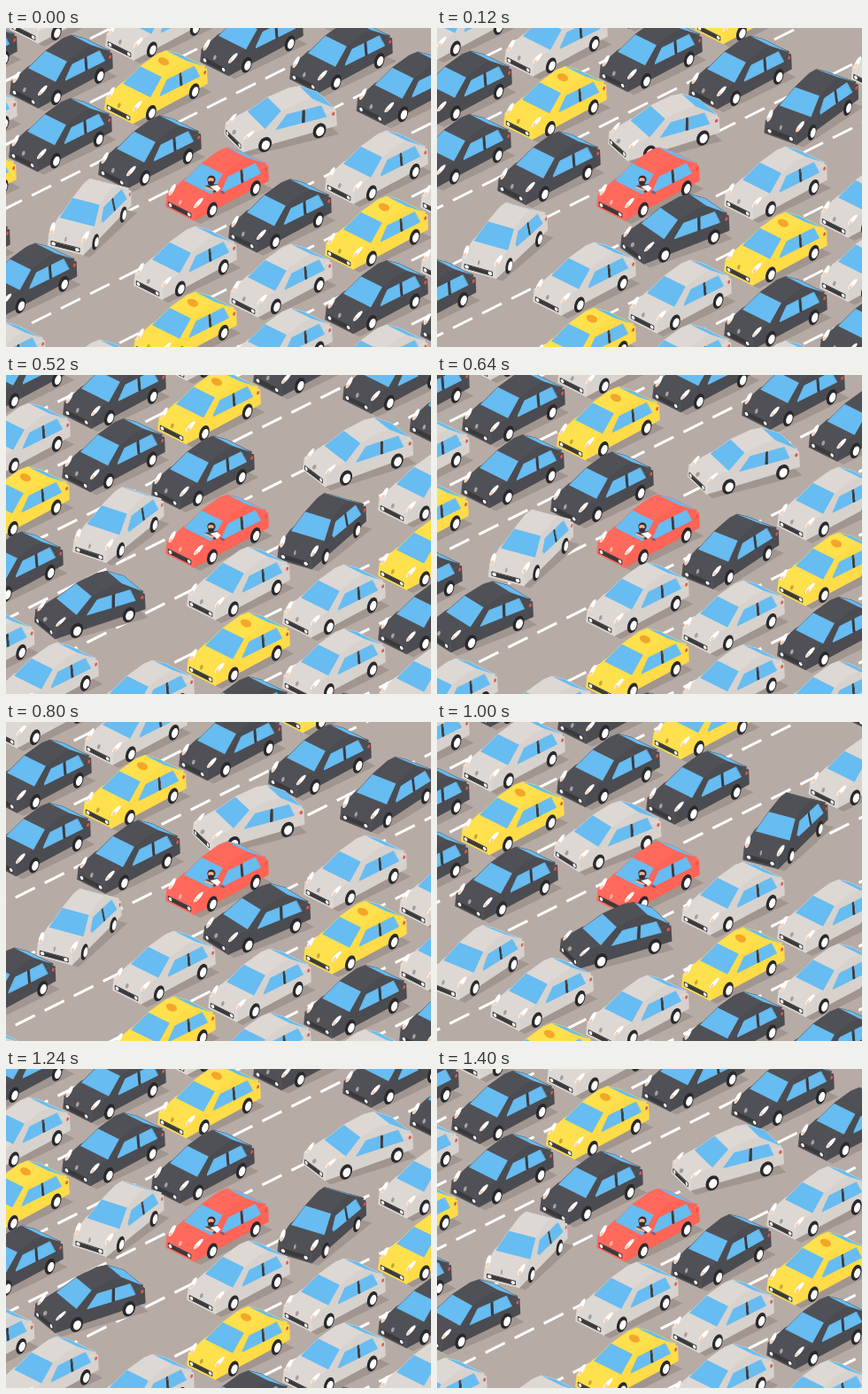
An HTML page for the animation above (1440 ms loop, 480 px wide and 360 px high).

```html
<!DOCTYPE html>
<html lang="en">
<head>
<meta charset="utf-8">
<title>Traffic</title>
<style>
html, body { margin: 0; width: 100%; height: 100%; overflow: hidden; background: #b7aba5; }
svg { display: block; width: 480px; height: 360px; }
</style>
</head>
<body>
<svg viewBox="0 0 480 360" width="480" height="360" stroke-linejoin="round" stroke-linecap="round">
  <defs id="defs"></defs>
  <rect width="480" height="360" fill="#b7aba5"/>
  <path id="dashes" stroke="#fff" stroke-width="3" stroke-linecap="butt"/>
  <g id="shadows" fill="#a0958f"></g>
  <g id="cars"></g>
</svg>
<script>
const TICK = 40, STEPS = 18, SLOT = 108, PERIOD = 2 * SLOT;
const GLASS = '#67bcf1', TRIM = '#3a3a3d', TYRE = '#29292c';
const $ = id => document.getElementById(id);

const paints = {
  black:  { top: '#505156', side: '#4b4c51', badge: '#a6a3a1' },
  gray:   { top: '#ddd8d4', side: '#d7d2cd', badge: '#a49d98' },
  yellow: { top: '#ffe04d', side: '#ffdc48', badge: '#c9a52e' },
  red:    { top: '#ff6a5c', side: '#ff6456', badge: '#ffb3a9' }
};

// Car space is [u forward, w to the near side, z up]; both halves mirror in w.
const shell = [[58, 21, 16], [30, 23, 22], [-58, 22, 22], [-59, 22, 6], [59, 22, 3]];
const cabin = [[31, 22, 22], [8, 17, 35], [-18, 16, 40], [-32, 16, 39], [-57, 20, 25]];

// turn is an angle on the ground
function projector(turn) {
  const a = Math.PI / 4 - turn, c = Math.cos(a), s = Math.sin(a);
  return ([u, w, z]) => [w * s - u * c, (u * s + w * c) / 2 - z];
}
const points = (proj, pts) => pts.map(p => proj(p).map(v => v.toFixed(1)).join()).join(' ');
const mirror = pts => pts.map(([u, w, z]) => [u, -w, z]).reverse();

function shadow(turn) {
  return points(projector(turn), [[56, 29, 0], [-58, 31, 0], [-58, -20, 0], [56, -20, 0]]);
}

function car(kind, turn = 0) {
  const proj = projector(turn), { top, side, badge } = paints[kind];
  let out = '';
  const poly = (fill, pts, edge = 0) => {
    out += `<polygon points="${points(proj, pts)}" fill="${fill}" stroke="${edge ? fill : 'none'}" stroke-width="${edge}"/>`;
  };
  const band = (fill, pts, edge) => poly(fill, [...pts, ...mirror(pts)], edge);
  // ellipse around p spanned by the half axes a and b
  const oval = (fill, p, a, b) => poly(fill, Array.from({ length: 18 }, (_, i) => {
    const t = i * Math.PI / 9;
    return p.map((v, j) => v + a[j] * Math.cos(t) + b[j] * Math.sin(t));
  }));
  const disc = (fill, p, r) => oval(fill, p, [r, 0, 0], [0, 0, r]);
  // side pane: rear and front ends along the belt line and the roof line
  const pane = (fill, low0, low1, high0, high1) => poly(fill, [
    [low0, 24, 19.5], [low1, 24, 19.5], [high1, 19.5, 30.5], [high0, 19.5, 30.5]
  ], 1);

  band(top, shell.slice(0, 3), 2);
  poly(side, shell, 2);
  band(top, [shell[0], shell[4]], 2);
  poly(side, cabin, 2);
  band(top, cabin, 1);
  band(GLASS, cabin.slice(3));
  band(GLASS, cabin.slice(0, 2));
  pane(GLASS, -14, 18, -17, 2);
  pane(TRIM, -18, -15, -20, -18);
  pane(GLASS, -45, -19, -41, -22);

  band(TRIM, [[60, 18, 9], [60, 18, 5]], 1);
  disc(badge, [59, 0, 15], 2.6);
  for (const m of [-1, 1]) {
    oval('#fff', [51, 21 * m, 19], [-6, m, 4], [0, 2.8, 0]);
    oval('#f6cfb4', [54, 20.5 * m, 16.5], [-2, 0, 1.5], [0, 1.8, 0]);
    oval('#fff', [60, 15 * m, 7], [0, 2.6, 0], [0, 0, 2]);
  }
  for (const u of [32, -37]) {
    disc(TYRE, [u, 24, 5.5], 8.4);
    disc('#fff', [u, 25.5, 5.5], 5.2);
  }
  disc('#e2574c', [-55, 23, 20], 2);
  disc(side, [25, 28, 23], 3.5);
  if (kind === 'yellow') oval('#f4a62a', [-10, 2, 41], [0, 8, 0], [-3, 0, 2.5]);
  return out;
}

// Driver behind the windscreen, drawn about the centre of the car.
const driver = `
  <path d="M-14-13L0-15L3-9L-3-5Z" fill="#4a4550"/>
  <path d="M-8-12L0-14L4-10L0-6Z" fill="#fff"/>
  <path d="M-13-11L-5-8" stroke="#f2b48f" stroke-width="2.2"/>
  <circle cx="-6.5" cy="-20" r="4.6" fill="#3d2b29"/>
  <ellipse cx="-7" cy="-19.5" rx="3.2" ry="2.4" fill="#f2b48f"/>
  <ellipse cx="-7" cy="-16" rx="3.4" ry="2.6" fill="#3d2b29"/>
  <path d="M5-6L7-5" stroke="#8b5876" stroke-width="3"/>`;

$('defs').innerHTML = Object.keys(paints)
  .map(kind => `<g id="${kind}">${car(kind)}${kind === 'red' ? driver : ''}</g>`).join('');
const flatShadow = shadow(0);

// [x + 2y of the lane, left edge at time zero, paint per slot]
const lanes = [
  [-126, 4, 'gray', 'black'],
  [20, 4, 'black', 'gray'],
  [162, 3, 'black', 'yellow'],
  [302, 104, 'black'],
  [592, 144, 'gray'],
  [740, 36, 'gray', 'yellow'],
  [885, 36, 'gray', 'black'],
  [1030, 36, 'black', 'gray']
];

function layout(n) {
  const list = [{ x: 238.5, y: 191, kind: 'red', turn: 0 }];
  for (const [c, left, ...kinds] of lanes) {
    kinds.forEach((kind, slot) => {
      for (let k = -3; k < 5; k++) {
        const x = left + slot * SLOT - 12 * n + PERIOD * k, y = (c - x) / 2;
        if (x > -135 && x < 490 && y > -95 && y < 365) {
          list.push({ x: x + 58.5, y: y + 56, kind, turn: 0 });
        }
      }
    });
  }
  // Cars in the middle lane swing out around the red one.
  for (const [kind, side, lag] of [['black', 1, 0], ['gray', -1, 9]]) {
    for (let k = -1; k < 4; k++) {
      const u = n - lag + STEPS * k;
      const p = Math.PI * Math.min(1, Math.max(0, u / 36));
      const out = side * 71.5 * Math.sin(p) ** 2;
      const turn = -side * Math.atan(.325 * Math.sin(2 * p));
      list.push({ x: 454 - 12 * u + out, y: 83 + 6 * u + out / 2, kind, turn });
    }
  }
  const depth = o => o.x + 2.3 * o.y;
  return list.sort((a, b) => depth(a) - depth(b));
}

function dashPath(n) {
  const gap = 33, start = (7 + n * 22 / 3) % gap - gap;
  let d = '';
  for (let c = -25; c < 1200; c += 144) {
    for (let x = start; x < 510; x += gap) {
      d += `M${x - 11} ${(c - x + 11) / 2}l22-11`;
    }
  }
  return d;
}

let last = -1;
function draw(now) {
  const n = Math.floor(now / TICK) % STEPS;
  if (n === last) return;
  last = n;
  const list = layout(n);
  const at = o => `transform="translate(${o.x.toFixed(2)} ${o.y.toFixed(2)})"`;
  $('dashes').setAttribute('d', dashPath(n));
  $('shadows').innerHTML = list.map(o =>
    `<polygon ${at(o)} points="${o.turn ? shadow(o.turn) : flatShadow}"/>`).join('');
  $('cars').innerHTML = list.map(o => o.turn
    ? `<g ${at(o)}>${car(o.kind, o.turn)}</g>`
    : `<use href="#${o.kind}" ${at(o)}/>`).join('');
}

const begin = performance.now();
function loop() {
  draw(performance.now() - begin);
  requestAnimationFrame(loop);
}
loop();
</script>
</body>
</html>
```
